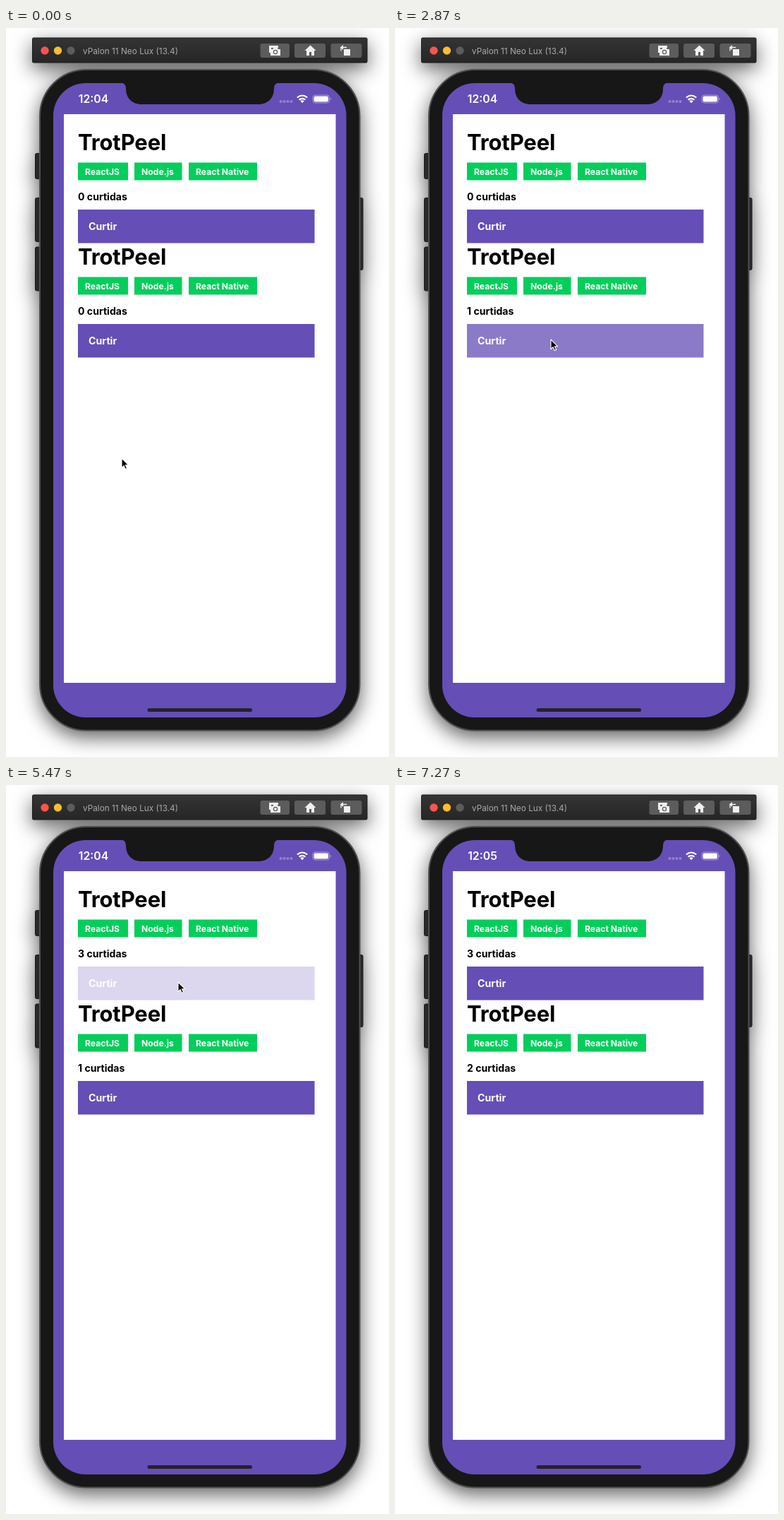
An HTML page for the animation above (7.74 s loop, 543x1032 px).

```html
<!DOCTYPE html>
<html lang="pt">
<head>
<meta charset="utf-8">
<style>
  html, body { margin: 0; width: 100%; height: 100%; overflow: hidden; background: #fff; }
  svg { display: block; width: 543px; height: 1032px; font-family: Inter, sans-serif; }
  .window { filter: drop-shadow(0 9px 14px rgba(0, 0, 0, .62)); }
  .bold { font-weight: 700; }
</style>
</head>
<body>
<svg viewBox="0 0 543 1032">
  <defs>
    <linearGradient id="bar" x2="0" y2="1">
      <stop stop-color="#343434"/><stop offset="1" stop-color="#262626"/>
    </linearGradient>
  </defs>

  <g class="window">
    <rect x="37.5" y="14" width="474.5" height="35" rx="1.5" fill="url(#bar)" stroke="#1c1c1c"/>
    <g fill="#292929" stroke="#1a1a1a">
      <rect x="41.5" y="177.5" width="9" height="36" rx="2"/>
      <rect x="41.5" y="240.5" width="9" height="62" rx="2"/>
      <rect x="41.5" y="310" width="9" height="62" rx="2"/>
      <rect x="497" y="240.5" width="9" height="102" rx="2"/>
    </g>
    <rect x="48" y="59" width="453.5" height="935.5" rx="66" fill="#171717" stroke="#505050" stroke-width="2"/>
  </g>

  <!-- title bar -->
  <circle cx="55" cy="32" r="5.7" fill="#fa544d"/>
  <circle cx="73.5" cy="32" r="5.7" fill="#fdbc2d"/>
  <circle cx="92" cy="32" r="5.7" fill="#5c5c5c"/>
  <text x="109" y="36.8" font-size="11.8" fill="#a9a9a9">vPalon 11 Neo Lux (13.4)</text>
  <g fill="#5c5c5c">
    <rect x="360.5" y="22" width="41.5" height="20" rx="3"/>
    <rect x="409" y="22" width="44" height="20" rx="3"/>
    <rect x="460.5" y="22" width="44" height="20" rx="3"/>
  </g>
  <g fill="#f0f0f0">
    <path d="M373 25h13v3h-10v7h-3z"/>
    <path d="M375 30h3l1.500-2h5l1.500 2h3v9h-14z"/>
    <circle cx="382" cy="34" r="2.600" fill="none" stroke="#5c5c5c" stroke-width="1.200"/>
    <path d="M431.500 24.500l8 7.500h-2.500v7h-4v-5h-3v5h-4v-7h-2.500z"/>
    <path d="M479 30h9v9h-9zM478 24l-4 3.500 4 3.500z"/>
    <path d="M475 32.500v-5h8" fill="none" stroke="#f0f0f0" stroke-width="1.300"/>
  </g>

  <!-- phone screen -->
  <rect x="67" y="78" width="415.500" height="898" rx="46" fill="#654eb6"/>
  <path d="M162 77.500q8 0 8 8c0 14 9 22.500 22 22.500H358c13 0 22-8.500 22-22.500q0-8 8-8z" fill="#171717"/>
  <rect x="82" y="122" width="385.500" height="805" fill="#fff"/>
  <rect x="200.500" y="963" width="148.500" height="5" rx="2.500" fill="#252229"/>

  <!-- status bar -->
  <text id="clock" x="124" y="106.300" font-size="15.800" font-weight="600" text-anchor="middle" fill="#fff"></text>
  <g fill="#fff">
    <g opacity=".3">
      <circle cx="389.500" cy="104" r="2"/><circle cx="394.500" cy="104" r="2"/>
      <circle cx="399.500" cy="104" r="2"/><circle cx="404.500" cy="104" r="2"/>
    </g>
    <path d="M420 106.300l-2.700-2.900q2.700-2.200 5.400 0z"/>
    <path d="M412.800 98.500q7.200-6 14.400 0M415.500 101.600q4.500-3.600 9 0" fill="none" stroke="#fff" stroke-width="2.100"/>
    <rect x="436.500" y="96.500" width="20.500" height="8" rx="2"/>
    <rect x="435" y="95" width="23.500" height="11" rx="3.300" fill="none" stroke="#fff" stroke-opacity=".45"/>
    <path d="M459.700 98.700q2.400 1.800 0 3.700z" opacity=".5"/>
  </g>

  <g id="cards"></g>
  <path id="cursor" d="M0 0V13.600l3.100-2.900 2.200 4.900 2.300-1-2.200-4.800h4.300z" fill="#000"
        stroke="#fff" stroke-width="1.100" stroke-linejoin="round"/>
</svg>

<script>
const LOOP = 7740;
const byId = id => document.getElementById(id);

const tag = (x, width, label) =>
  `<rect x="${x}" y="190.500" width="${width}" height="25" fill="#04ce5b"/>
   <text class="bold" x="${x + 10}" y="207.500" font-size="12.200" fill="#fff">${label}</text>`;

const cardMarkup = y =>
  `<g transform="translate(0 ${y})">
    <text class="bold" x="102" y="173" font-size="31" letter-spacing="-.15">TrotPeel</text>
    ${tag(102, 71, 'ReactJS')}${tag(182, 67.5, 'Node.js')}${tag(259, 97, 'React Native')}
    <text class="likes bold" x="102" y="243.500" font-size="14.100"></text>
    <g class="button">
      <rect x="102" y="257" width="335.500" height="47.500" fill="#654eb6"/>
      <text class="bold" x="117" y="285.700" font-size="14.200" fill="#fff">Curtir</text>
    </g>
  </g>`;

byId('cards').innerHTML = cardMarkup(0) + cardMarkup(162);
const likes = document.querySelectorAll('.likes');
const buttons = document.querySelectorAll('.button');

// [press, release] times for each card
const taps = [
  [[4400, 4605], [4920, 5090], [5270, 5440]],
  [[2500, 2720], [6290, 6470]]
];

// [time, x, y] of the pointer tip
const pointer = [
  [0, 164, 609], [600, 164, 609], [1700, 268, 512], [2070, 265, 494],
  [2400, 221, 441], [2960, 221, 441], [3330, 245, 508], [3600, 246, 508],
  [3730, 246, 505], [4270, 244, 279], [5600, 244, 279], [6070, 221, 426],
  [6200, 221, 439], [6700, 221, 441], [7070, 235, 500]
];

const clamp = v => Math.min(1, Math.max(0, v));
const ease = v => v < .5 ? 2 * v * v : 1 - 2 * (1 - v) ** 2;

const tapOpacity = (t, [press, release]) => {
  const down = ease(clamp((t - press) / 150));
  const up = ease(clamp((t - release) / 250));
  return 1 - .8 * down * (1 - up);
};

function pointerAt(t) {
  const next = pointer.findIndex(p => p[0] > t);
  if (next < 0) return null;
  const [t0, x0, y0] = pointer[next - 1], [t1, x1, y1] = pointer[next];
  const k = ease((t - t0) / (t1 - t0));
  return [x0 + (x1 - x0) * k, y0 + (y1 - y0) * k];
}

function draw(now) {
  const t = now % LOOP;
  taps.forEach((list, i) => {
    likes[i].textContent = `${list.filter(tap => t >= tap[1]).length} curtidas`;
    buttons[i].setAttribute('opacity', Math.min(...list.map(tap => tapOpacity(t, tap))));
  });
  byId('clock').textContent = t < 6700 ? '12:04' : '12:05';
  const at = pointerAt(t);
  byId('cursor').style.display = at ? '' : 'none';
  if (at) byId('cursor').setAttribute('transform', `translate(${at})`);
  requestAnimationFrame(draw);
}
draw(performance.now());
</script>
</body>
</html>
```
